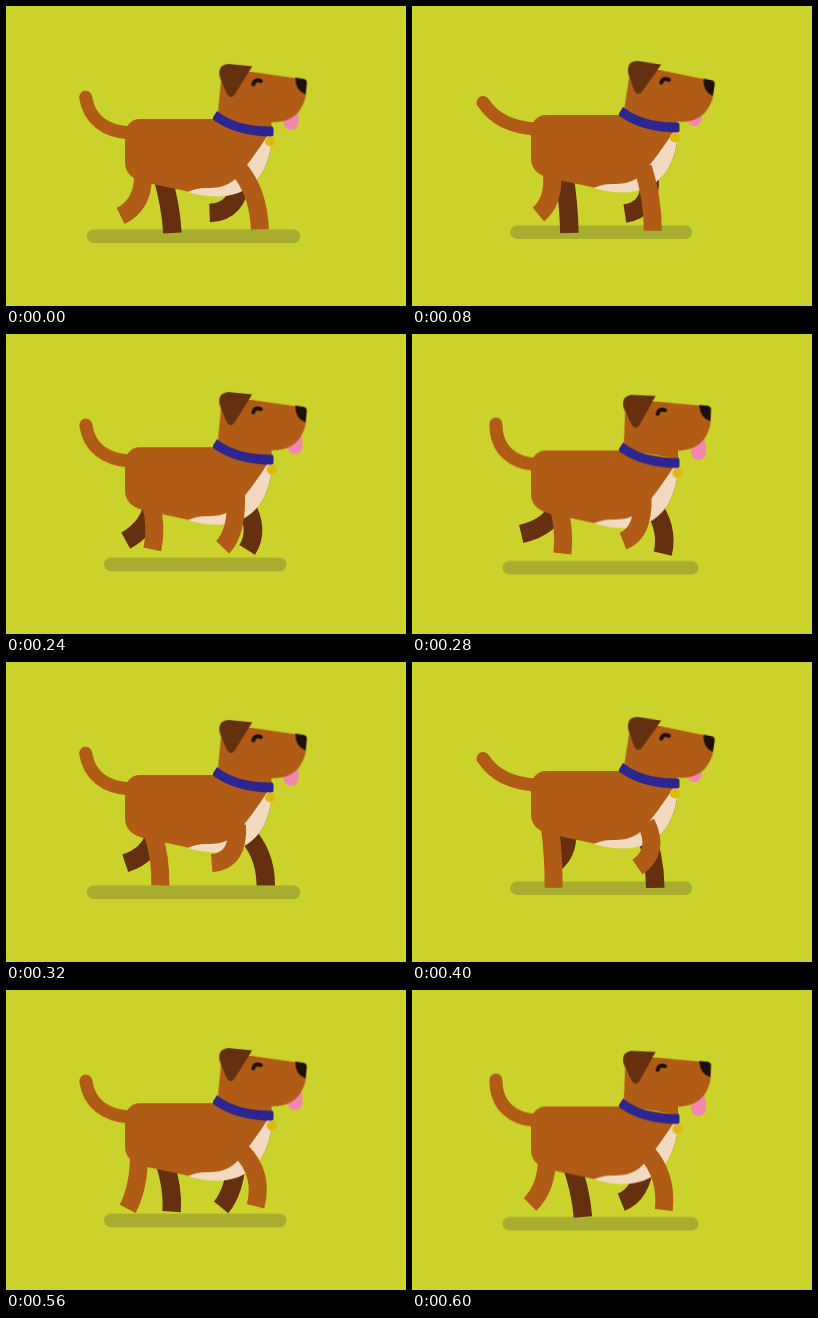
An HTML page without scripts for the animation above (0.64 s loop, 400 px wide and 300 px high).

```html
<!DOCTYPE html>
<html lang="en">
<head>
<meta charset="utf-8">
<title>Walking dog</title>
<style>
:root {
  --step: 160ms;
  --loft: cubic-bezier(.333, .667, .667, 1); /* parabola: fast off the ground, slow at the top */
  --coat: #b05b16;
  --dark: #65300f;
}
html, body { margin: 0; width: 100%; height: 100%; overflow: hidden; background: #cad22b; }
svg { display: block; width: 100vw; height: 100vh; }

.coat { fill: var(--coat); }
.dark { fill: var(--dark); }
.ink { fill: #1c1209; }
.limb { fill: none; stroke: var(--coat); stroke-width: 18; }
.far { stroke: var(--dark); stroke-width: 18.5; }
.tail { stroke-width: 13; stroke-linecap: round; }

/* The body rises and falls once per half stride. */
.bob { animation: bob var(--step) var(--loft) -40ms infinite alternate; }
.head { animation: nod var(--step) var(--loft) -40ms infinite alternate; transform-origin: 235px 110px; }
.tail { animation: wag var(--step) linear -40ms infinite alternate; }
.shadow { animation: shrink var(--step) var(--loft) infinite alternate; }
.tag { animation: swing var(--step) ease-in-out -240ms infinite alternate; }
.tongue { animation: loll calc(2 * var(--step)) linear -240ms infinite; }

@keyframes bob {
  from { transform: translateY(3.6px); }
  to { transform: translateY(-4.5px); }
}
@keyframes nod {
  from { transform: translate(-.5px, -1.5px) rotate(-3.4deg); }
  to { transform: translate(-.5px, 1.6px) rotate(3.6deg); }
}
@keyframes wag {
  from { d: path("M84 86.5C84 112 100 125.5 124 127"); }
  to { d: path("M67 105C80 117 98 125.5 124 127"); }
}
@keyframes shrink {
  from { x: 80.5px; width: 214px; }
  to { x: 104px; width: 171.5px; }
}
@keyframes swing {
  from { transform: translateX(-1px); }
  to { transform: translateX(2px); }
}
@keyframes loll {
  0%, 100% { transform: translate(-2.5px, -4px); }
  50% { transform: translate(4.5px, -4px); }
  62.5% { transform: translate(2px, 2px); }
}

/* Legs: one pose per quarter stride, each a curve from hip to foot. */
.leg { animation: calc(4 * var(--step)) linear infinite; }
.hind { animation-name: hind; }
.fore { animation-name: fore; }
.hind.far { animation-name: hind-far; animation-delay: -600ms; animation-delay: -40ms; }
.fore.far { animation-name: fore-far; }

@keyframes hind {
  0%, 100% { d: path("M137 170Q137 199 114.5 210"); }
  25% { d: path("M143 168Q147 192 138 207"); }
  50% { d: path("M147 172Q155 195 154.5 223.5"); }
  75% { d: path("M129 158Q129 195 129 228"); }
}
@keyframes hind-far {
  0%, 100% { d: path("M158 170Q169 200 171 227"); }
  25% { d: path("M150 166Q153 198 153 227"); }
  50% { d: path("M146 172Q139 193 109 200"); }
  75% { d: path("M158 168Q162 192 149 205"); }
}
@keyframes fore {
  0%, 100% { d: path("M233 163Q253 187 254 223.5"); }
  25% { d: path("M229 160Q229 198 228 226"); }
  50% { d: path("M231 163Q233 199 205.5 201"); }
  75% { d: path("M237 158.500Q263 180 245 209"); }
}
@keyframes fore-far {
  0%, 100% { d: path("M235 172Q232 206 203.5 207"); }
  25% { d: path("M240 170Q248 201 222 208"); }
  50% { d: path("M237 168Q260 190 260 223.5"); }
  75% { d: path("M226 165Q226 195 227 228"); }
}
</style>
</head>
<body>
<svg viewBox="0 0 400 300">
  <g class="bob">
    <rect class="shadow" y="223.5" height="13.6" rx="6.8" fill="#a7ad2e"/>
  </g>

  <path class="limb leg hind far"/>
  <path class="limb leg fore far"/>
  <rect class="tongue" x="277" y="102" width="15" height="22" rx="7.5" fill="#f286b0"/>

  <g class="bob">
    <path class="limb tail"/>
    <path class="coat" d="M119 128A15 15 0 0 1 134 113H212L266 122V131C264 170 242 190 212 190Q196 190 182 185.5L137 176Q119 171 119 156Z"/>
    <path fill="#f1dabf" d="M266 130C264 170 242 190.5 212 190.5Q196 190.5 182 186Q190 182 200 182Q222 183 233 169Q246 153 256 138Q259 133 262 129Z"/>
  </g>

  <path class="limb leg hind"/>
  <path class="limb leg fore"/>

  <g class="bob">
    <circle class="tag" cx="263.7" cy="135.5" r="5" fill="#dfb90c"/>
    <g class="head">
      <path class="coat" d="M212 112L216.5 66H246L293 73L301 76Q302 91 297 100Q289 117 266 116.5V125Z"/>
      <path class="dark" d="M223 58L247 60.5L229 89Q225 94 221.5 88L214.5 71Q212 59 223 58Z"/>
      <path class="ink" d="M290 72L298 73.3Q302 74 301.5 78L300 89Q290 85 290 72Z"/>
      <path d="M248 78.5Q249.5 73 255.5 75.3" fill="none" stroke="#1c1209" stroke-width="4" stroke-linecap="round"/>
    </g>
    <path fill="#2e258f" d="M211 105Q231 121 265.5 120.5Q267.5 120.5 267.5 122.5V128.5Q267.5 130.5 265 130.5Q230 130 208 114.5Q206 113 207.2 111Z"/>
  </g>
</svg>
</body>
</html>
```
